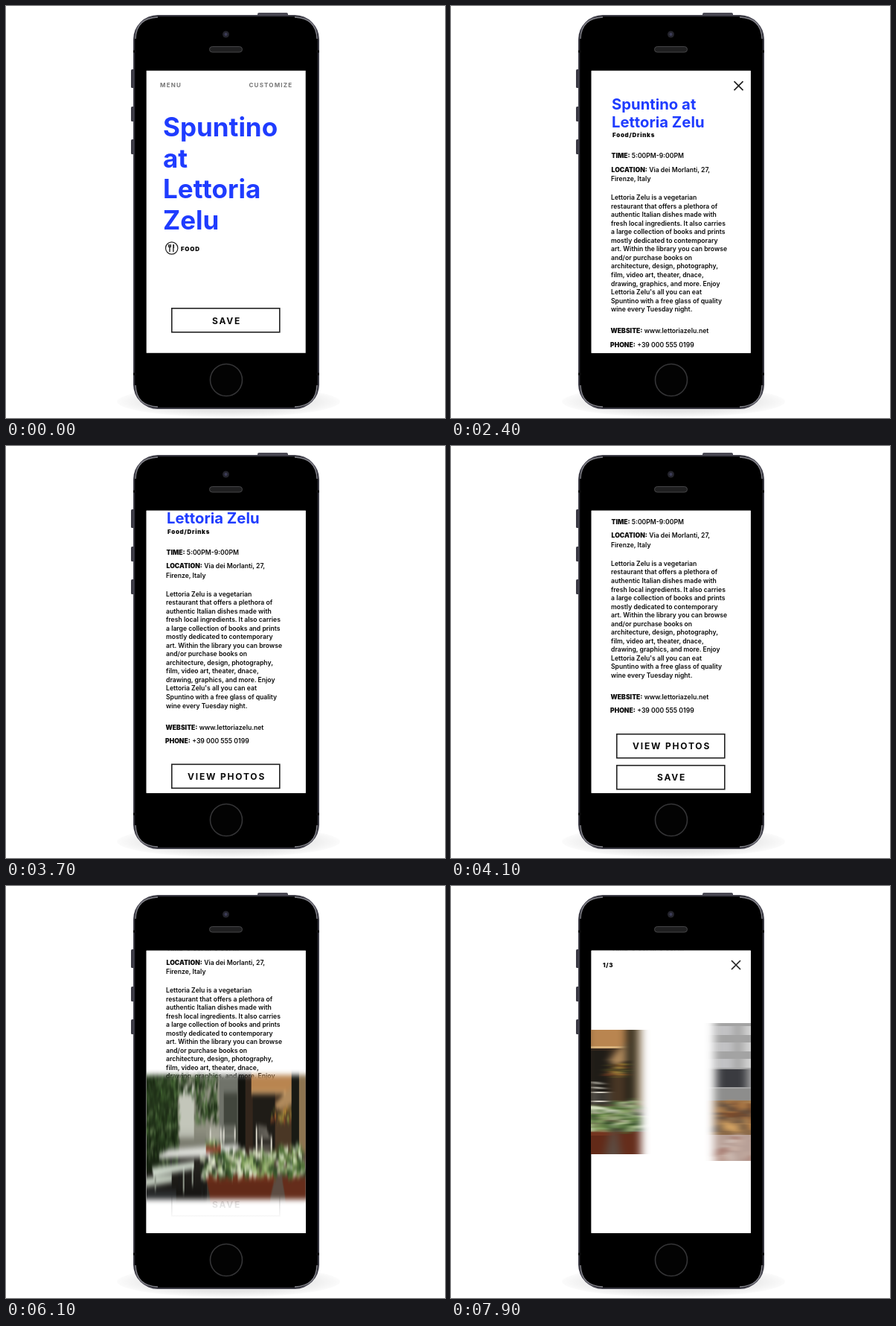
Recreate the animation shown at these times as an HTML page. Size 590 by 553 pixels, loop 8 s.

```html
<!DOCTYPE html>
<html lang="en">
<head>
<meta charset="utf-8">
<title>Event app on a phone</title>
<style>
  html, body { margin: 0; width: 100%; height: 100%; overflow: hidden; background: #fff; }
  svg { display: block; }
  text { font-family: Inter, "Open Sans", sans-serif; font-weight: 700; fill: #0c0c0c; white-space: pre; }
  .copy { font-size: 8.65px; font-weight: 600; }
  .copy .key { font-weight: 900; }
  .nav { font-size: 8px; letter-spacing: 1.2px; fill: #777; }
  .label { font-size: 8px; font-weight: 900; letter-spacing: .7px; }
  .button rect { fill: #fff; stroke: #222; stroke-width: 1.6; }
  .button text { font-size: 12px; letter-spacing: 1.8px; }
  .button.on rect { stroke: #1f3cff; }
  .button.on text { fill: #1f3cff; }
  .cross { stroke: #222; stroke-width: 1.7; fill: none; }
</style>
</head>
<body>
<svg id="stage" width="590" height="553" viewBox="0 0 590 553">
  <defs>
    <clipPath id="screen"><rect x="188.7" y="86.8" width="214" height="379"/></clipPath>
    <filter id="pageBlur" filterUnits="userSpaceOnUse" x="188" y="-150" width="216" height="1000" color-interpolation-filters="sRGB"><feGaussianBlur/></filter>
    <filter id="photoBlur" filterUnits="userSpaceOnUse" x="100" y="100" width="720" height="360" color-interpolation-filters="sRGB"><feGaussianBlur/></filter>
    <linearGradient id="fade" x2="0" y2="200" gradientUnits="userSpaceOnUse">
      <stop stop-color="#fff" stop-opacity="0"/><stop offset="1" stop-color="#fff"/>
    </linearGradient>
    <radialGradient id="shadow"><stop offset=".6" stop-color="#e4e4e4"/><stop offset="1" stop-color="#fbfbfb"/></radialGradient>
    <linearGradient id="shade" x2="0" y2="1">
      <stop offset=".3" stop-opacity="0"/><stop offset="1" stop-opacity=".65"/>
    </linearGradient>
  </defs>

  <!-- phone -->
  <ellipse cx="299" cy="531" rx="150" ry="21" fill="url(#shadow)"/>
  <rect x="338" y="9" width="41" height="8" rx="2" fill="#4a4954"/>
  <g fill="#3a3943">
    <rect x="168" y="85" width="6" height="25" rx="1.5"/>
    <rect x="168" y="135" width="6" height="20" rx="1.5"/>
    <rect x="168" y="179" width="6" height="20" rx="1.5"/>
  </g>
  <rect x="171" y="12" width="250" height="529" rx="33" fill="#45444f"/>
  <rect x="173" y="14" width="246" height="525" rx="31" fill="#000" stroke="#1b1b20"/>
  <path d="M174 44Q175 16 204 15M418 44Q417 16 388 15M174 509Q175 537 204 538M418 509Q417 537 388 538" fill="none" stroke="#85858c" stroke-width="1.4"/>
  <path d="M171 61h4M171 494h4M417 61h4M417 494h4" stroke="#0a0a0a" stroke-width="3"/>
  <circle cx="295.5" cy="38" r="4.5" fill="#24242c"/><circle cx="295.5" cy="38" r="2" fill="#3d3d58"/>
  <rect x="273.5" y="54.5" width="44" height="7.5" rx="3.7" fill="#1f1f20" stroke="#454547"/>
  <circle cx="296" cy="502" r="21.5" fill="#030303" stroke="#353537" stroke-width="1.6"/>

  <g clip-path="url(#screen)">
    <rect x="188" y="86" width="216" height="381" fill="#fff"/>
    <text class="nav" x="207" y="108.5">MENU</text>
    <text class="nav" x="326.5" y="108.5">CUSTOMIZE</text>
    <g id="home"></g>
    <g id="page" filter="url(#pageBlur)"></g>
    <rect id="wipe" x="188" width="216" height="9000" fill="url(#fade)"/>
    <g id="photos" filter="url(#photoBlur)"></g>
    <g id="header">
      <text class="label" x="204" y="109">1/3</text>
      <path class="cross" d="M377 100l12 12m0-12l-12 12"/>
    </g>
  </g>
</svg>
<script>
const $ = id => document.getElementById(id);
const rect = (x, y, w, h, fill) => `<rect x="${x}" y="${y}" width="${w}" height="${h}" fill="${fill}"/>`;
const poly = (points, fill) => `<polygon points="${points}" fill="${fill}"/>`;
const line = (d, color, width) => `<path d="${d}" stroke="${color}" stroke-width="${width}" fill="none"/>`;
const text = (x, y, s, attrs = '') => `<text x="${x}" y="${y}" ${attrs}>${s}</text>`;
const copy = (x, y, s) => text(x, y, s, 'class="copy"');
const key = (x, y, k, s) => copy(x, y, `<tspan class="key">${k}:</tspan> ${s}`);
const button = (y, x, s, id = '') =>
  `<g class="button" id="${id}"><rect x="222.8" y="${y + .8}" width="145" height="32"/>${text(x, y + 21.5, s)}</g>`;

let seed = 7;
const rnd = () => (seed = seed * 16807 % 2147483647) / 2147483647;

// Scatter tilted leaves over a box
function leaves(n, x, y, w, h, size, colors) {
  let out = '';
  for (let i = 0; i < n; i++) {
    const cx = (x + rnd() * w).toFixed(1), cy = (y + rnd() * h).toFixed(1);
    const rx = size * (.6 + rnd() * .8);
    out += `<ellipse cx="${cx}" cy="${cy}" rx="${rx}" ry="${rx * .5}" fill="${colors[rnd() * colors.length | 0]}" transform="rotate(${rnd() * 180 | 0} ${cx} ${cy})"/>`;
  }
  return out;
}

$('home').innerHTML =
  '<g id="title" font-size="35">' +
  ['Spuntino', 'at', 'Lettoria', 'Zelu'].map((s, i) => text(211, 175 + i * 41.6, s, 'style="fill:inherit"')).join('') + '</g>' +
  '<circle cx="222.7" cy="325" r="8.2" fill="#fff" stroke="#222" stroke-width="1.2"/>' +
  line('M220 320v10M224.9 320v10', '#222', 1.4) + line('M218.4 320v3.5h3.2v-3.5M225.6 320v5', '#222', 1) +
  text(235, 328.5, 'FOOD', 'class="label"') + button(405, 277, 'SAVE');

const story = `Lettoria Zelu is a vegetarian
restaurant that offers a plethora of
authentic Italian dishes made with
fresh local ingredients. It also carries
a large collection of books and prints
mostly dedicated to contemporary
art. Within the library you can browse
and/or purchase books on
architecture, design, photography,
film, video art, theater, dnace,
drawing, graphics, and more. Enjoy
Lettoria Zelu's all you can eat
Spuntino with a free glass of quality
wine every Tuesday night.`.split('\n');

$('page').innerHTML = rect(188, 87, 216, 750, '#fff') +
  '<g font-size="20.3">' + ['Spuntino at', 'Lettoria Zelu'].map((s, i) =>
    text(216, 138.5 + i * 24, s, 'style="fill:#1f3cff"')).join('') + '</g>' +
  text(217, 176, 'Food/Drinks', 'class="label"') +
  '<path class="cross" d="M380.5 101l12 12m0-12l-12 12"/>' +
  key(215.5, 204, 'TIME', '5:00PM-9:00PM') +
  key(215.5, 222.5, 'LOCATION', 'Via dei Morlanti, 27,') + copy(215, 235, 'Firenze, Italy') +
  story.map((s, i) => copy(215, 260 + i * 11.54, s)).join('') +
  key(214.5, 439, 'WEBSITE', 'www.lettoriazelu.net') +
  key(214, 457.5, 'PHONE', '+39 000 555 0199') +
  button(485, 244, 'VIEW PHOTOS', 'view') + button(527, 277, 'SAVE');

const green = ['#16240f', '#263d1c', '#35522a', '#466a34', '#1b2c14', '#6f8c5a'];
const pale = ['#d3dfba', '#9db876', '#6d8d4a', '#4c6d33', '#e4ead2', '#34522a', '#253d1e'];
const patio =
  rect(0, 0, 214, 167, '#37342d') + rect(38, 0, 64, 104, '#8f9081') + rect(44, 14, 20, 70, '#c3c6ba') +
  rect(0, 0, 42, 130, '#22331a') + leaves(420, 0, 0, 45, 125, 2.6, green) +
  leaves(40, 40, 0, 30, 30, 3, green) + leaves(170, 66, 0, 30, 64, 2.8, green) +
  rect(98, 0, 27, 100, '#70736a') + rect(104, 24, 18, 72, '#42463d') +
  rect(133, 0, 81, 112, '#33261c') + rect(141, 0, 56, 24, '#b98550') + rect(141, 22, 56, 3, '#d9b27c') +
  rect(143, 28, 30, 72, '#1f1c17') + rect(173, 26, 24, 78, '#4a3725') +
  poly('172,40 196,14 196,40 178,48', '#b08a5c') +
  leaves(60, 168, 46, 28, 18, 2, ['#c9a132', '#b4512b', '#66762e', '#e0c35a', '#3a2b1c']) +
  rect(123, 0, 10, 112, '#12120e') + rect(205, 0, 9, 112, '#8d7450') + rect(195, 0, 10, 118, '#191a14') +
  poly('130,110 214,104 214,167 130,167', '#5c4c42') + rect(0, 30, 80, 137, 'url(#shade)') +
  line('M148 69v45M150 70l12 3M150 77l14 2M150 84h18v28M148 96h21M155 84v30', '#ddd9cc', 2) +
  line('M86 72v20M86 72h14v18M104 72v18M104 71h15v18M86 79h33M86 85h33', '#d6d5cb', 2) +
  line('M33 108v58M44 108v46M75 106v60M80 106v60', '#1a1a18', 2.6) +
  poly('7,125 64,116 64,126 10,136', '#d3ddd0') + poly('0,138 34,134 34,144 0,150', '#c6d0c2') +
  line('M12 135v20M50 128v30M62 126v22', '#8d9488', 2) +
  poly('16,108 30,100 118,93 128,97 108,109 18,112', '#dedfda') +
  rect(0, 154, 40, 13, '#292b2c') + rect(80, 95, 20, 9, '#8e3a28') + leaves(24, 79, 89, 22, 6, 2.5, pale) +
  poly('80,136 173,136 166,167 86,167', '#622a18') + rect(79, 134, 95, 8, '#74351f') +
  poly('182,137 214,137 214,167 187,167', '#652d1b') +
  leaves(210, 76, 104, 98, 32, 4.3, pale) + leaves(100, 176, 96, 38, 40, 4.3, pale);

let market = rect(0, 0, 214, 186, '#a3a3a3');
for (let i = 0; i < 18; i++)
  market += rect(3 + i % 6 * 36, 4 + (i / 6 | 0) * 22, 24, 12, i % 2 ? '#d2d2d2' : '#c2c2c4');
market += rect(4, 62, 40, 24, '#3a3b40') + rect(60, 62, 140, 24, '#55565a') + rect(0, 88, 214, 16, '#8d8d8c') +
  rect(0, 104, 214, 48, '#8c6a48') + leaves(90, 0, 104, 214, 38, 6, ['#c98c4a', '#7a4b2c', '#d9a764', '#5c4a3c']) +
  rect(0, 150, 214, 36, '#b8a097') + leaves(40, 0, 152, 214, 34, 6, ['#d3c3bb', '#a5786d', '#c9b0a4']);

$('photos').innerHTML =
  `<svg x="188.7" y="193" width="214" height="167">${patio}</svg>` +
  `<svg x="501" y="184" width="214" height="185">${market}</svg>`;

const clamp = v => Math.min(1, Math.max(0, v));
// Share of the way still left
const left = (t, start, span, power) => (1 - clamp((t - start) / span)) ** power;

const pageY = t => 379 * left(t, 1900, 600, 4.5);
const photoY = t => 273 * left(t, 5600, 1300, 3.1);
const photoX = t => 312 * (left(t, 7600, 1300, 2.44) - 1);
const scroll = t => t >= 4400 ? 117 : 117 * (1 - Math.cos(Math.PI * clamp((t - 2880) / 1640))) / 2 * (t > 2900);

// Place a layer and smear it along its path, shutter open for 50 ms
function move(id, x, y, bx, by) {
  const el = $(id), blur = id.replace(/s$/, '') + 'Blur';
  el.setAttribute('transform', `translate(${x} ${y})`);
  const sx = Math.abs(bx) / 3.46, sy = Math.abs(by) / 3.46;
  if (sx + sy < .1) el.removeAttribute('filter');
  else {
    $(blur).firstElementChild.setAttribute('stdDeviation', `${sx} ${sy}`);
    el.setAttribute('filter', `url(#${blur})`);
  }
}

function draw(now) {
  const t = Math.floor(now % 8000 / 100) * 100, delta = f => f(t) - f(t - 50);
  $('title').setAttribute('fill', t < 1300 ? '#1f3cff' : '#0c0c0c');
  move('page', 0, pageY(t) - scroll(t), 0, delta(pageY));
  move('photos', photoX(t), photoY(t), delta(photoX), delta(photoY));
  $('view').classList.toggle('on', t >= 5300);
  $('wipe').setAttribute('transform', `translate(0 ${250 - .9 * (t - 6100)})`);
  $('header').setAttribute('opacity', clamp((t - 6500) / 400));
  requestAnimationFrame(() => draw(performance.now()));
}
draw(0);
</script>
</body>
</html>
```
